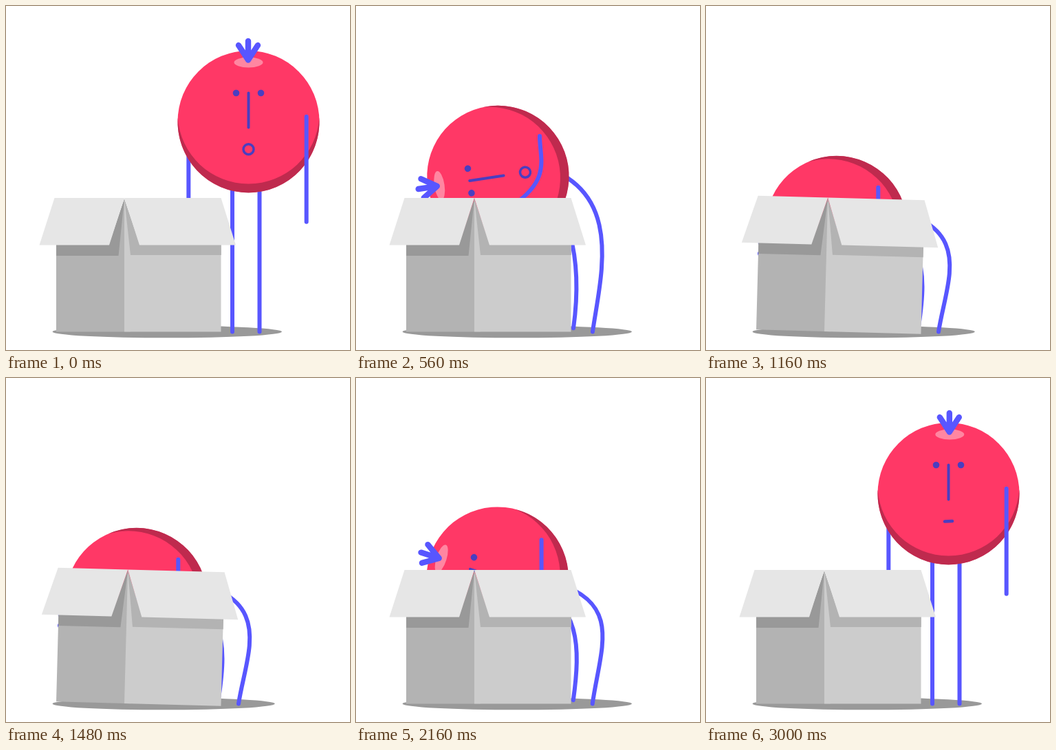
These frames come from a looping animation (500x500 px, 5000 ms). An HTML page:

```html
<!DOCTYPE html>
<html lang="en">
<head>
<meta charset="utf-8">
<title>Fruit and box</title>
<style>
  html, body { margin: 0; width: 100%; height: 100%; overflow: hidden; background: #fff; }
  svg { display: block; width: 100%; height: 100%; }
  .limb { fill: none; stroke: #5856ff; stroke-width: 6; stroke-linecap: round; }
  .leaf { fill: none; stroke: #5856ff; stroke-width: 8.4; stroke-linecap: round; stroke-linejoin: round; }
  .line { fill: none; stroke: #4a3ec0; stroke-width: 4; stroke-linecap: round; }
</style>
</head>
<body>
<svg viewBox="0 0 500 500">
  <ellipse id="shadow" cy="473.5" ry="8.8" fill="#999"/>
  <path id="armL" class="limb"/>
  <path id="legL" class="limb"/>
  <path id="legR" class="limb"/>
  <g id="ball">
    <circle r="103" fill="#ff3866"/>
    <path fill="#bf2a4e" d="M-102.8-6A103 103 0 1 0 102.8-6A103 103 0 0 1-102.8-6Z"/>
    <g id="crown">
      <ellipse cy="-86" rx="21" ry="7.4" fill="#ff86a1"/>
      <path class="leaf" d="M-14.5-111L-.5-89.5L13.5-111M-.5-117V-89.5"/>
    </g>
    <circle cx="-18" cy="-41.5" r="4.8" fill="#4a3ec0"/>
    <circle cx="18" cy="-41.5" r="4.8" fill="#4a3ec0"/>
    <path class="line" d="M0-41.5V8.5"/>
    <circle id="gasp" class="line" cy="40.2" r="7.5" style="stroke-width:3.5"/>
    <path id="flat" class="line" d="M-5.5 40.6L5.5 40" style="stroke-width:4.5"/>
  </g>
  <path id="armR" class="limb"/>
  <g id="box">
    <path fill="#b3b3b3" d="M73 340H163L172 280L181 340V473.5H73Z"/>
    <path fill="#ccc" d="M172 280L181 340H312.5V473.5H172Z"/>
    <path fill="#999" d="M172 280L163.5 363H73V345H150Z"/>
    <path fill="#b3b3b3" d="M172 280L181 362H312.8V345H194Z"/>
    <path fill="#e6e6e6" d="M70.5 279H172L150 347.5H48.5ZM172 279H312.5L334 347.5H194Z"/>
  </g>
</svg>
<script>
const LOOP = 5000, STEP = 40;
const $ = id => document.getElementById(id);
const clamp = v => Math.min(1, Math.max(0, v));
const ramp = (t, from, to) => clamp((t - from) / (to - from));
const ease = (t, from, to) => {
  const u = ramp(t, from, to);
  return u * u * (3 - 2 * u);
};
// One half sine wave between two times
const hump = (t, from, to) => Math.sin(Math.PI * ramp(t, from, to));

// How far the fruit is in the box: 0 standing, 1 tucked in
function tuck(t) {
  if (t > 1500) return {
    across: 1 - ramp(t, 2000, 2510) ** 2,
    down: 1 - ease(t, 2015, 2520),
    turned: 1 - ease(t, 1920, 2530)
  };
  const across = 1 - (1 - ease(t, 0, 900)) ** 2;
  return { across, down: ease(t, 200, 900), turned: across };
}

const rock = t => t > 972 && t < 1932 ? -2.9 * Math.cos((t - 1052) / 320 * 2 * Math.PI) : 0;

function limb(id, ...points) {
  const [a, ...rest] = points.map(p => p.join(' '));
  $(id).setAttribute('d', `M${a}C${rest.join(' ')}`);
}

// The hip follows the fruit, the foot slides along the floor
function leg(id, x, y, pose, knee, slide, lift, late) {
  const { across, turned } = pose;
  const hip = [x - 130 * turned ** 1.3, y + 82 - 112 * turned];
  const foot = [x - slide * across ** late, 473.5 - lift * across ** late];
  limb(id, hip,
    [x + knee * turned, hip[1] + 75 - 55 * across ** 2],
    [foot[0] + 12 * across, foot[1] - 78],
    foot);
}

// Arms hang from the shoulder; swing moves the hand outwards, lift raises it
function arm(id, side, x, y, turned, swing, lift) {
  const angle = (side * 85 - 39 * ease(turned, 0, 0.8)) * Math.PI / 180;
  const reach = side > 0 ? 84.5 : 87.5;
  const sx = x + reach * Math.sin(angle), sy = y - reach * Math.cos(angle);
  const drop = 153 - 60 * turned, out = side * swing;
  limb(id, [sx, sy],
    [sx, sy + drop * 0.33],
    [sx - out * 0.45, sy + drop * 0.62],
    [sx + out, sy + drop - lift]);
}

function draw(t) {
  const pose = tuck(t), tilt = rock(t), after = t > 1000;
  const shrug = ease(t, 2340, 2520) - ease(t, 2760, 3000);
  const x = 352.5 - 163 * pose.across;
  const y = 168 + 153 * pose.down - 4 * hump(t, 0, 240) + 2.5 * shrug;

  $('ball').setAttribute('transform', `translate(${x} ${y}) rotate(${-110 * pose.turned})`);
  $('crown').setAttribute('transform', `translate(${after ? 1.8 : 0} 0)`);
  $('gasp').style.display = after ? 'none' : '';
  $('flat').style.display = after ? '' : 'none';

  const swing = 54 * shrug - 50 * hump(t, 0, 760), lift = 65 * shrug ** 3;
  arm('armR', 1, x, y + tilt, pose.turned, swing, lift);
  arm('armL', -1, x, y, pose.turned, swing, lift);
  leg('legR', 368.5, y, pose, 30, 30.5, 0, 2);
  leg('legL', 329, y, pose, -5, 20, 8, 4);

  $('box').setAttribute('transform', `rotate(${tilt} 192 473)`);
  const left = 67.5, right = 401 - 6.7 * tilt;
  $('shadow').setAttribute('cx', (left + right) / 2);
  $('shadow').setAttribute('rx', (right - left) / 2);
}

const start = performance.now();
function tick() {
  const t = (performance.now() - start) % LOOP;
  draw(Math.floor(t / STEP) * STEP);
  requestAnimationFrame(tick);
}
tick();
</script>
</body>
</html>
```
